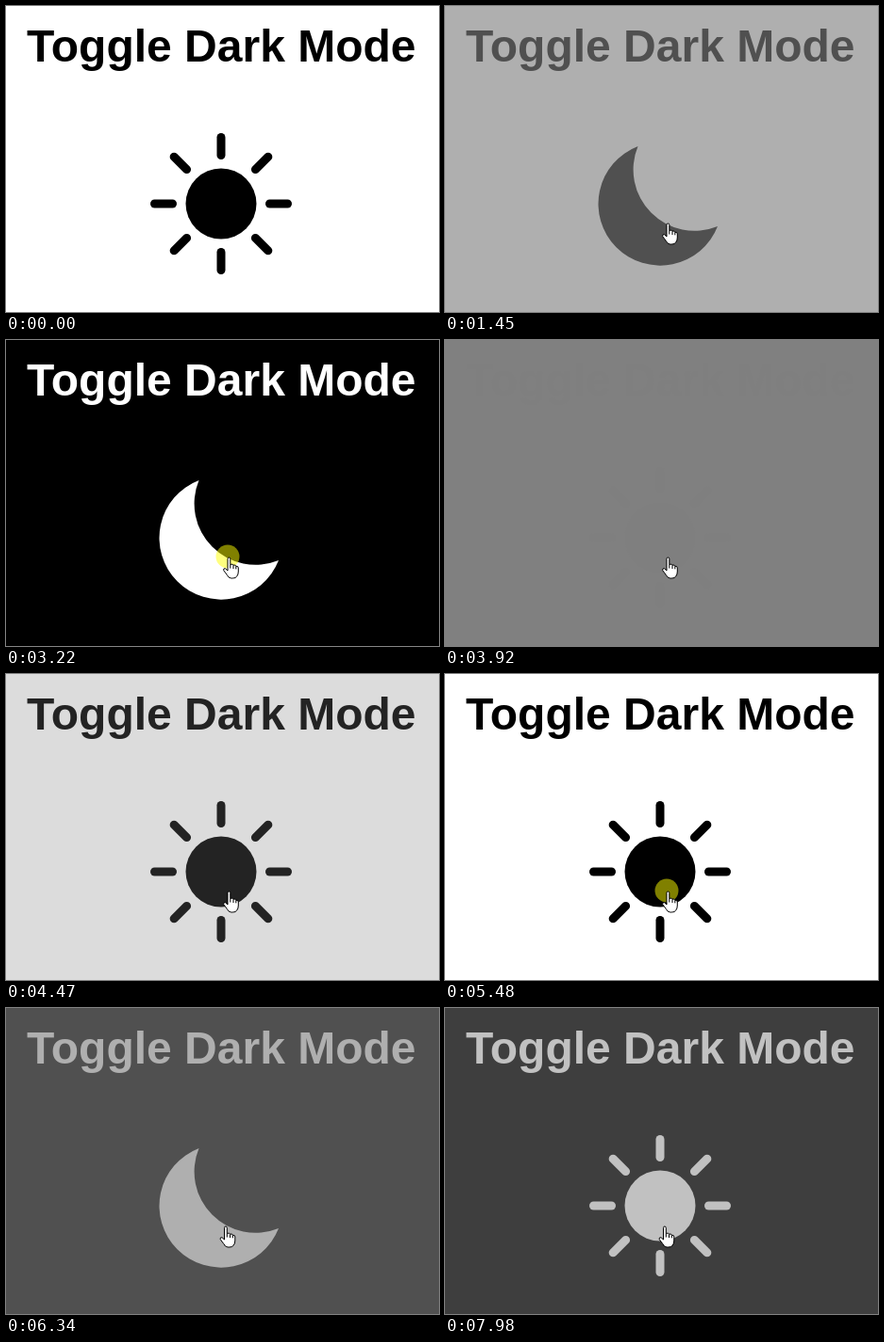
Recreate the animation shown at these times as an HTML page. Size 459x325 px, loop 8000 ms.

```html
<!DOCTYPE html>
<html lang="en">
<head>
<meta charset="utf-8">
<title>Toggle Dark Mode</title>
<style>
  html, body { margin: 0; width: 100%; height: 100%; overflow: hidden; }
  svg { display: block; }
  text { font: bold 48px "Liberation Sans", Arial, sans-serif; }
</style>
</head>
<body>
<svg id="stage" width="459" height="325" viewBox="0 0 459 325" fill="currentColor">
  <text x="22" y="59">Toggle Dark Mode</text>
  <g id="sun" transform="translate(228 210)">
    <circle r="37.5"/>
    <g id="rays" stroke="currentColor" stroke-width="9" stroke-linecap="round"></g>
  </g>
  <path id="moon" d="M204.5 149A65.5 65.5 0 1 0 289 234A65 65 0 0 1 204.5 149Z"/>
  <g id="cursor" fill="#fff" stroke="#000" stroke-linejoin="round">
    <circle id="press" cx="-.5" cy="-1" r="12.5" fill="#ff0" fill-opacity=".5" stroke="none"/>
    <path id="arrow" d="M0 0V16L3.7 12.5L6.2 18.3L8.6 17.3L6.2 11.5H11.3Z"/>
    <g id="hand">
      <path d="M-.5 1.5Q-.5 0 .8 0Q2.3 0 2.3 1.5V7.5Q5 6.3 5.5 8.2Q7.8 7.2 8.3 9.3Q10.8 8.8 10.8 11V15Q10.8 18.5 9 20.3Q8 22 5 22H3Q0 21.5 -1.2 18.5L-4.8 13.7Q-5.3 11.3 -3 11.7L-.5 14Z"/>
      <path d="M2.3 7.5V11.5M5.5 8.2V12M8.3 9.3V12.3" fill="none"/>
    </g>
  </g>
</svg>
<script>
const LOOP = 8000, FADE = 2000;
// Each click: button down, highlight off, start of the colour fade
const clicks = [
  { down: 970, up: 1050, fade: 1035 },
  { down: 3220, up: 3390, fade: 3333 },
  { down: 5480, up: 5560, fade: 5534 },
  { down: 7580, up: 7660, fade: 7626 },
];
const $ = id => document.getElementById(id);
const show = (id, on) => $(id).style.display = on ? '' : 'none';
const clamp = x => Math.min(1, Math.max(0, x));

$('rays').innerHTML = Array.from({ length: 8 }, (_, i) =>
  `<path d="M51.5 0H70.5" transform="rotate(${i * 45})"/>`).join('');

// CSS "ease": cubic-bezier(.25, .1, .25, 1)
function ease(x) {
  const bezier = (a, b, s) => 3 * a * s * (1 - s) ** 2 + 3 * b * s * s * (1 - s) + s ** 3;
  let low = 0, high = 1;
  for (let i = 0; i < 24; i++) {
    const mid = (low + high) / 2;
    if (bezier(.25, .25, mid) < x) low = mid; else high = mid;
  }
  return bezier(.1, 1, low);
}

function cursorPosition(t) {
  const away = (1 - clamp((t - 340) / 380)) ** 1.5;
  const nudge = clamp((t - 5640) / 160);
  return [235.5 + 27 * away - 3.5 * nudge, 231 + 66 * away + nudge];
}

function draw(t) {
  const started = clicks.filter(c => t >= c.fade);
  const dark = started.length % 2 === 1;
  const progress = started.length ? ease(clamp((t - started.at(-1).fade) / FADE)) : 1;
  const ink = Math.round(255 * (dark ? progress : 1 - progress));
  const gray = v => `rgb(${v},${v},${v})`;
  $('stage').style.color = gray(ink);
  $('stage').style.background = gray(255 - ink);
  show('sun', !dark);
  show('moon', dark);

  const [x, y] = cursorPosition(t);
  $('cursor').setAttribute('transform', `translate(${x} ${y})`);
  show('cursor', t >= 340);
  show('arrow', y > 285);
  show('hand', y <= 285);
  show('press', clicks.some(c => t >= c.down && t < c.up));
}

const start = performance.now();
function tick() {
  draw((performance.now() - start) % LOOP);
  requestAnimationFrame(tick);
}
tick();
</script>
</body>
</html>
```
